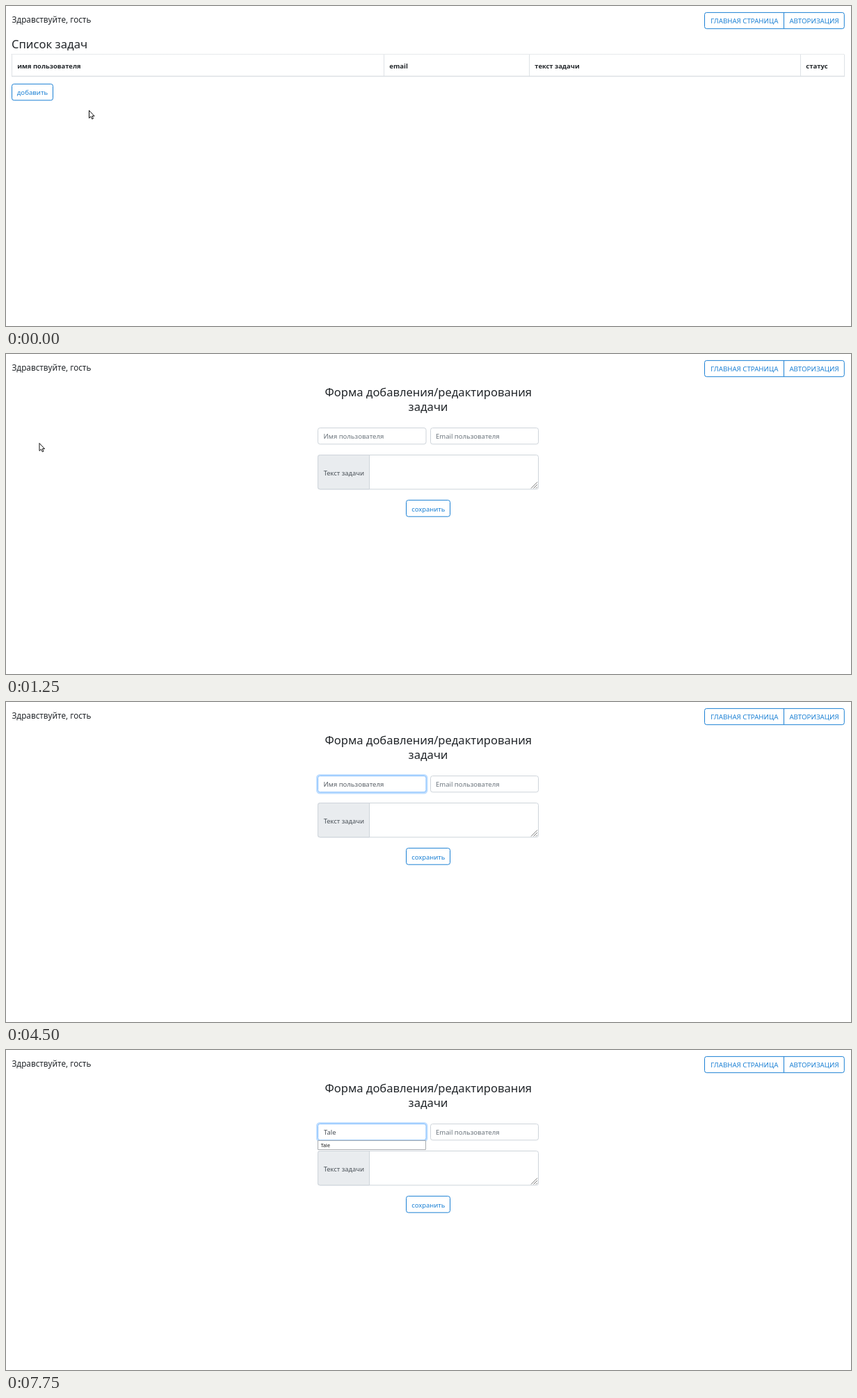
Write an HTML page with a canvas that moves like this. It is 1215 px wide and 461 px high and loops after 8 s.

```html
<!DOCTYPE html>
<html lang="ru">
<head>
<meta charset="utf-8">
<title>Список задач</title>
<style>
  html, body { margin: 0; width: 100%; height: 100%; overflow: hidden; background: #fff; }
  canvas { display: block; width: 1215px; height: 461px; }
</style>
</head>
<body>
<canvas id="stage"></canvas>
<script>
const W = 1215, H = 461, LOOP = 8000;
const BLUE = '#1b80d4', FILL = '#007bff', INK = '#212529', GRAY = '#6c757d', VALUE = '#495057';
const FONT = '"Noto Sans", "Open Sans", sans-serif';
const canvas = document.getElementById('stage');
const ctx = canvas.getContext('2d');
const ratio = window.devicePixelRatio || 1;
canvas.width = W * ratio;
canvas.height = H * ratio;

// Each list holds [start time, value]; a value stays until the next start.
const pointer = [
  [0, ['arrow', 119.5, 150.5]], [250, ['arrow', 92.5, 132.5]], [500, ['hand', 47.5, 128.2]],
  [1250, ['arrow', 48, 128.5]], [1750, ['arrow', 286.5, 128.5]], [2000, ['arrow', 462.5, 137.5]],
  [2250, ['arrow', 482.5, 126.5]], [2500, null]
];
const typed = [
  [0, ''], [3500, 'ЕФ'], [4250, 'Е'], [4500, ''], [5750, 'T'], [6000, 'TA'],
  [7000, 'T'], [7250, 'Tal'], [7750, 'Tale']
];
const caret = [
  [0, false], [2500, true], [3000, false], [4000, true], [4250, false],
  [5000, true], [5500, false], [6750, true], [7000, false]
];
const hover = [[0, 0], [500, 0.6], [750, 1]];

function at(track, t) {
  let value = track[0][1];
  for (const [start, v] of track) if (t >= start) value = v;
  return value;
}

function text(s, x, y, size, color = INK, weight = 400, align = 'left') {
  ctx.font = `${weight} ${size}px ${FONT}`;
  ctx.fillStyle = color;
  ctx.textAlign = align;
  ctx.fillText(s, x, y);
}

function box(x, y, w, h, r, stroke, fill, width = 1) {
  ctx.beginPath();
  ctx.roundRect(x, y, w, h, r);
  if (fill) { ctx.fillStyle = fill; ctx.fill(); }
  if (stroke) { ctx.strokeStyle = stroke; ctx.lineWidth = width; ctx.stroke(); }
}

function line(x1, y1, x2, y2, color, width = 1) {
  ctx.beginPath();
  ctx.moveTo(x1, y1);
  ctx.lineTo(x2, y2);
  ctx.strokeStyle = color;
  ctx.lineWidth = width;
  ctx.stroke();
}

function header() {
  text('Здравствуйте, гость', 8.5, 24, 11.7);
  box(1004.5, 9.4, 200.8, 23.3, 3, BLUE);
  line(1118.5, 9.4, 1118.5, 32.7, BLUE);
  text('ГЛАВНАЯ СТРАНИЦА', 1061.8, 25.3, 9.7, BLUE, 400, 'center');
  text('АВТОРИЗАЦИЯ', 1162, 25.3, 9.7, BLUE, 400, 'center');
}

function listPage(t) {
  text('Список задач', 8, 60.5, 16.6);
  ctx.setLineDash([1, 1]);
  line(8, 69.5, 1206, 69.5, '#cfd4d9');
  ctx.setLineDash([]);
  for (const x of [8.5, 543.5, 752.5, 1142.5, 1205.5]) line(x, 70, x, 101, '#dee2e6');
  line(8, 101.2, 1206, 101.2, '#dee2e6', 1.6);
  text('имя пользователя', 16.3, 89.6, 9.4, INK, 700);
  text('email', 551.3, 89.6, 9.5, INK, 700);
  text('текст задачи', 760.3, 89.6, 9.4, INK, 700);
  text('статус', 1150.3, 89.6, 9.5, INK, 700);

  const k = at(hover, t);
  ctx.globalAlpha = k;
  box(8.5, 112.4, 59, 23.4, 3, null, FILL);
  ctx.globalAlpha = 1;
  box(8.5, 112.4, 59, 23.4, 3, t >= 1000 ? '#4da2f8' : k ? FILL : BLUE);
  text('добавить', 38, 128.3, 9.6, k ? '#fff' : BLUE, 400, 'center');
}

function nameField(t) {
  const focus = t >= 2500;
  if (focus) box(447.2, 105.2, 158, 26, 4, 'rgba(0,123,255,.25)', null, 2.5);
  box(448.5, 106.5, 155.5, 23.3, 3, focus ? '#80bdff' : '#ced4da', '#fff');
  const value = at(typed, t);
  if (value) text(value, 457, 122.4, 9.4, VALUE);
  else text('Имя пользователя', 456.5, 122.4, 9.5, focus ? '#596067' : GRAY);
  if (at(caret, t)) {
    ctx.font = `400 9.4px ${FONT}`;
    const x = Math.round(457 + ctx.measureText(value).width) + 0.5;
    line(x, 112, x, 125, '#555c63');
  }
}

function formPage(t) {
  text('Форма добавления/редактирования', 607.3, 60.5, 16.5, INK, 400, 'center');
  text('задачи', 607, 82, 16.5, INK, 400, 'center');

  box(610.5, 106.5, 155, 23.3, 3, '#ced4da', '#fff');
  text('Email пользователя', 618, 122.4, 9.5, GRAY);
  nameField(t);

  box(448.5, 145.5, 317, 49.3, 3, '#ced4da', '#fff');
  box(448.5, 145.5, 74, 49.3, [3, 0, 0, 3], '#ced4da', '#e9ecef');
  text('Текст задачи', 485.8, 174.5, 9.4, VALUE, 400, 'center');
  for (const d of [9, 5.5, 2]) line(764 - d, 193.5, 764, 193.5 - d, '#666', 0.9);

  box(575.5, 210.6, 63, 23.6, 3, BLUE);
  text('сохранить', 607.3, 227.2, 9.4, BLUE, 400, 'center');

  if (t >= 5750) {
    box(448.5, 130.5, 155, 13, 0, '#a9acb0', '#fff');
    text('Tale', 452.7, 140, 7.1, '#111');
  }
}

const shapes = {
  arrow: new Path2D('M0 0V11L2.5 8.7L4.3 12.4L6 11.6L4.3 8.1H7.6Z'),
  hand: new Path2D('M3.2 9V1.3Q3.2 0 4.2 0Q5.2 0 5.2 1.3V5.2Q6.8 4.4 7.2 5.7Q8.8 5 9.2 6.3Q11 5.8 11 7.6V10.5Q11 12.4 9.7 13.6V15.3H4V13.8L.8 9.9Q-.1 8.5 .9 8Q1.8 7.6 3.2 9ZM5.2 5.2V8M7.2 5.7V8.3M9.2 6.3V8.6')
};

function drawPointer(state) {
  if (!state) return;
  const [shape, x, y] = state;
  ctx.save();
  ctx.translate(x, y);
  ctx.fillStyle = '#fff';
  ctx.strokeStyle = '#111';
  ctx.lineWidth = 1;
  ctx.lineJoin = 'round';
  ctx.fill(shapes[shape]);
  ctx.stroke(shapes[shape]);
  ctx.restore();
}

function render(t) {
  ctx.setTransform(ratio, 0, 0, ratio, 0, 0);
  ctx.fillStyle = '#fff';
  ctx.fillRect(0, 0, W, H);
  header();
  if (t < 1250) listPage(t);
  else formPage(t);
  drawPointer(at(pointer, t));
}

function tick() {
  render(performance.now() % LOOP);
  requestAnimationFrame(tick);
}
tick();
</script>
</body>
</html>
```
